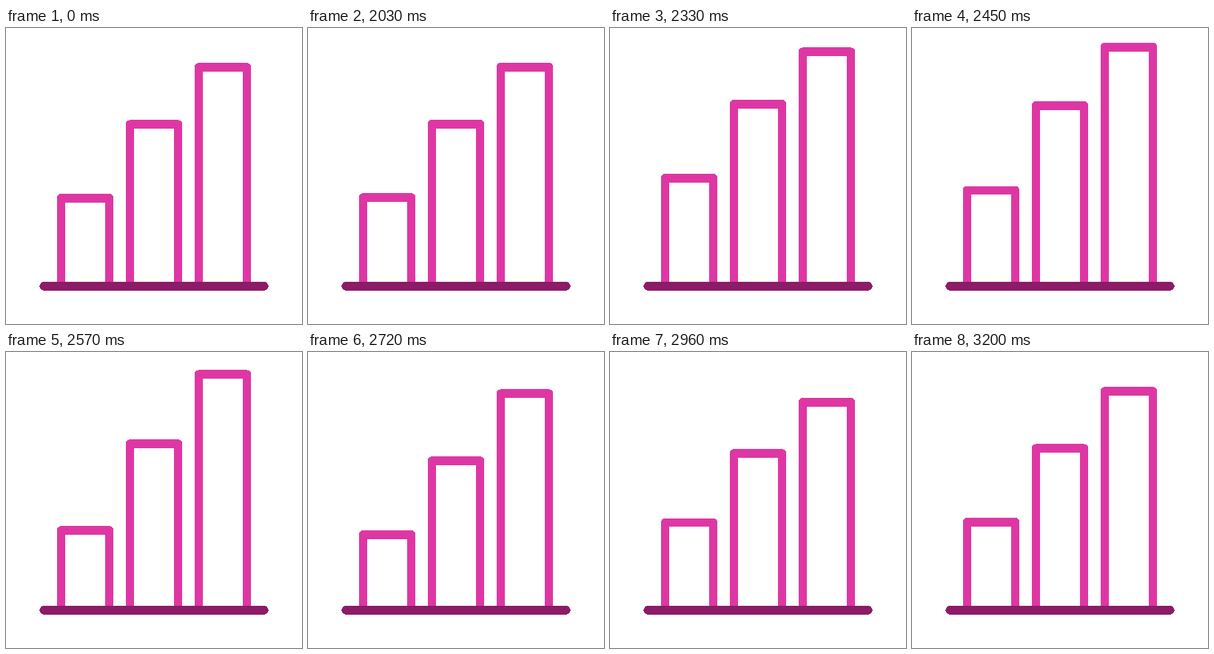
Animation, 400 px wide and 400 px high, one loop 3230 ms. Source, as an HTML page:

```html
<!DOCTYPE html>
<html lang="en">
<head>
<meta charset="utf-8">
<title>Bar chart</title>
<style>
  html, body { margin: 0; width: 100%; height: 100%; overflow: hidden; background: #fff; }
  svg { display: block; width: 100%; height: 100%; }
  path { fill: none; stroke: #de37a4; stroke-width: 11.63; stroke-linejoin: round; shape-rendering: crispEdges; }
  .base { stroke: #8c1b68; stroke-linecap: round; }
</style>
</head>
<body>
<svg viewBox="0 0 400 400">
  <path class="bar"/>
  <path class="bar"/>
  <path class="bar"/>
  <path class="base" d="M51.16 348.84H348.84"/>
</svg>
<script>
const LOOP = 3230, START = 2000, STEP = 30, DROP = 18.6, BASE = 348.84;

// Keys are in steps: highest point, lowest point, back at rest.
const bars = [
  { left: 74.42, right: 139.53, top: 229.77, lift: 27.9, keys: [10, 22, 33.5] },
  { left: 167.44, right: 232.56, top: 130.23, lift: 29, keys: [12.87, 25.45, 36.5] },
  { left: 260.47, right: 325.58, top: 53.02, lift: 27.9, keys: [16.45, 28.75, 40] }
];
const paths = document.querySelectorAll('.bar');

const ease = u => u * u * (3 - 2 * u);

function offset(step, { lift, keys }) {
  const times = [0, ...keys];
  const values = [0, -lift, DROP, 0];
  if (step <= 0 || step >= keys[2]) return 0;
  const i = times.findIndex(k => k > step);
  const u = (step - times[i - 1]) / (times[i] - times[i - 1]);
  return values[i - 1] + (values[i] - values[i - 1]) * ease(u);
}

function draw(ms) {
  const step = Math.floor((ms % LOOP - START) / STEP);
  bars.forEach((bar, i) => {
    const y = (bar.top + offset(step, bar)).toFixed(2);
    paths[i].setAttribute('d', `M${bar.left} ${BASE}V${y}H${bar.right}V${BASE}`);
  });
}

const origin = performance.now();
function tick() {
  draw(performance.now() - origin);
  requestAnimationFrame(tick);
}
tick();
</script>
</body>
</html>
```
